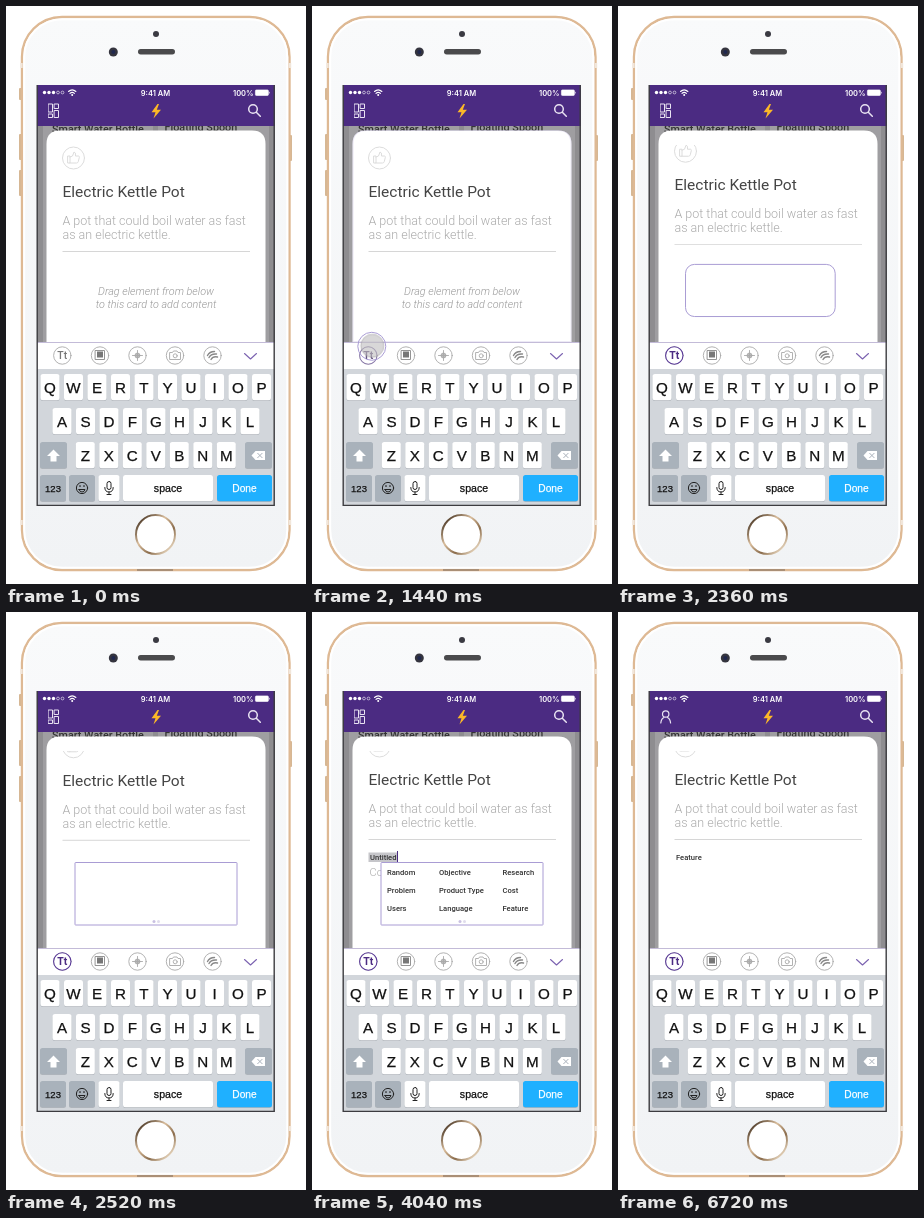
An HTML page for the animation above (7040 ms loop, 300x578 px).

```html
<!DOCTYPE html>
<html lang="en">
<head>
<meta charset="utf-8">
<title>Add a text element</title>
<style>
  html, body { margin: 0; width: 100%; height: 100%; overflow: hidden; background: #fff; }
  svg { display: block; width: 300px; height: 578px; }
  text { font-family: Roboto, sans-serif; }
  .status { font-family: Inter, sans-serif; }
  .keys text { font-family: "Liberation Sans", sans-serif; }
  .mid { text-anchor: middle; }
  .line { fill: none; stroke-linecap: round; stroke-linejoin: round; }
  .bold { font-size: 7.6px; font-weight: 500; fill: #333; }
  .touch { fill: rgba(190, 188, 190, .6); stroke: rgba(150, 147, 150, .45); }

  .a { animation: 7.04s linear infinite; }
  .cut { animation-timing-function: step-end; }

  #press { animation-name: press; }
  #drag { animation-name: drag; }
  #active { animation-name: active; }
  #glow { animation-name: glow; }
  #hint { animation-name: hint; }
  #scroll { animation-name: scroll; }
  #box { animation-name: morph; }
  #popup { animation-name: popup; }
  #dots { animation-name: dots; }
  #words, #draft { animation-name: words; }
  #untitled { animation-name: untitled; }
  #feature { animation-name: feature; }
  #pick { animation-name: pick; }
  #caret1 { animation-name: caret1; }
  #caret2 { animation-name: caret2; }
  #tiles { animation-name: tiles; }
  #person { animation-name: person; }

  @keyframes press { 0%, 15.3% { opacity: 0 } 17.6%, 26.14% { opacity: 1 } 28.4%, 100% { opacity: 0 } }
  @keyframes drag {
    0%, 19.03% { transform: none; animation-timing-function: ease-in-out }
    23.3%, 100% { transform: translate(16px, -41px) }
  }
  @keyframes active { 0%, 19% { opacity: 0 } 22%, 100% { opacity: 1 } }
  @keyframes glow { 0%, 19.6% { opacity: 0 } 23.3%, 27% { opacity: 1 } 28.98% { opacity: .6 } 32%, 100% { opacity: 0 } }
  @keyframes hint { 0%, 26.14% { opacity: 1 } 28.4%, 100% { opacity: 0 } }
  @keyframes scroll {
    0%, 31.25% { transform: none; animation-timing-function: ease-in-out }
    36.6%, 100% { transform: translateY(-18px) }
  }
  @keyframes morph {
    0%, 17.6% { x: 42px; y: 336px; width: 28px; height: 28px; rx: 14px; opacity: 0; fill-opacity: 0 }
    19.03% { x: 42px; y: 336px; width: 28px; height: 28px; rx: 14px; opacity: 1; fill-opacity: 0; animation-timing-function: ease-in-out }
    23.3%, 28.98% { x: 58px; y: 295px; width: 28px; height: 28px; rx: 14px; opacity: 1; fill-opacity: 0; animation-timing-function: cubic-bezier(.5, 0, .55, .9) }
    33.52% { x: 67.5px; y: 258.5px; width: 149.5px; height: 52px; rx: 9px; opacity: 1; fill-opacity: 1; animation-timing-function: ease-out }
    35.8%, 100% { x: 69px; y: 250.5px; width: 162px; height: 62.5px; rx: .5px; opacity: 1; fill-opacity: 1 }
  }
  @keyframes popup { 0% { opacity: 1 } 73.29%, 100% { opacity: 0 } }
  @keyframes dots { 0%, 34.6% { opacity: 0 } 35.8%, 100% { opacity: 1 } }
  @keyframes words { 0%, 36.3% { opacity: 0 } 40.6%, 100% { opacity: 1 } }
  @keyframes untitled { 0% { opacity: 1 } 71.01%, 100% { opacity: 0 } }
  @keyframes feature { 0% { opacity: 0 } 71.01%, 100% { opacity: 1 } }
  @keyframes pick { 0%, 68.6% { opacity: 0 } 70.4%, 71% { opacity: 1 } 72.7%, 100% { opacity: 0 } }
  @keyframes caret1 { 0% { opacity: 0 } 46.01% { opacity: 1 } 51.69% { opacity: 0 } 57.38% { opacity: 1 } 62.49%, 100% { opacity: 0 } }
  @keyframes caret2 { 0% { opacity: 0 } 78.97% { opacity: 1 } 84.65% { opacity: 0 } 90.33% { opacity: 1 } 95.44%, 100% { opacity: 0 } }
  @keyframes tiles { 0%, 78.8% { opacity: 1 } 83.2%, 100% { opacity: 0 } }
  @keyframes person { 0%, 78.8% { opacity: 0 } 83.2%, 100% { opacity: 1 } }
</style>
</head>
<body>
<svg viewBox="0 0 300 578">
  <defs>
    <clipPath id="screen"><rect x="31" y="79" width="238" height="421"/></clipPath>
    <clipPath id="page"><rect x="40" y="139.5" width="220" height="196.5"/></clipPath>
    <clipPath id="below"><rect x="31" y="120" width="238" height="216"/></clipPath>
    <linearGradient id="shell" x2="0" y2="1">
      <stop stop-color="#f9fafb"/><stop offset="1" stop-color="#f1f3f5"/>
    </linearGradient>
    <linearGradient id="metal" x2="1" y2="1">
      <stop offset=".1" stop-color="#4d3a28"/><stop offset=".4" stop-color="#d9bd9c"/>
      <stop offset=".65" stop-color="#8a6c4c"/><stop offset=".9" stop-color="#eddcc4"/>
    </linearGradient>
  </defs>

  <!-- phone body -->
  <g fill="#d6b794">
    <rect x="13" y="82" width="3" height="12" rx="1"/>
    <rect x="13" y="128" width="3" height="26" rx="1"/>
    <rect x="13" y="164" width="3" height="26" rx="1"/>
    <rect x="283" y="129" width="3" height="26" rx="1"/>
  </g>
  <rect x="16" y="11" width="267.5" height="553" rx="40" fill="url(#shell)" stroke="#deb994" stroke-width="2.4"/>
  <rect x="18.2" y="13.2" width="263.1" height="548.6" rx="38" fill="none" stroke="#fff" stroke-width="2"/>
  <path d="M15.5 57v5M284 57v5M15.5 514v5M284 514v5" stroke="#f1e6da" stroke-width="2.4"/>
  <path d="M131 564h36" stroke="#99826c" stroke-width="1.5"/>
  <circle cx="150" cy="28" r="3" fill="#3a3a42"/>
  <circle cx="107.3" cy="46" r="4.5" fill="#34343e"/>
  <circle cx="107.3" cy="46" r="2" fill="#20284e"/>
  <rect x="132" y="43" width="37" height="5.4" rx="2.7" fill="#4a4a4c"/>
  <circle cx="149.5" cy="528.5" r="19.5" fill="#fff" stroke="url(#metal)" stroke-width="2"/>

  <g clip-path="url(#screen)">
    <!-- dimmed list behind the card -->
    <rect x="31" y="120" width="238" height="216" fill="#8e8d90"/>
    <g clip-path="url(#below)">
      <path d="M37 120h110v216h-110zM152 120h111v216h-111z" fill="#9f9ea1"/>
      <g font-size="10.8" font-weight="500" fill="#333">
        <text x="46" y="126.8">Smart Water Bottle</text>
        <text x="158.5" y="125">Floating Spoon</text>
      </g>
    </g>

    <!-- header -->
    <rect x="31" y="79" width="238" height="41" fill="#4b2b82"/>
    <g fill="#fff" font-size="7.5" font-weight="600">
      <circle cx="38.5" cy="86.5" r="1.7"/><circle cx="43" cy="86.5" r="1.7"/><circle cx="47.5" cy="86.5" r="1.7"/>
      <g fill="none" stroke="#fff" stroke-width=".6"><circle cx="52" cy="86.5" r="1.4"/><circle cx="56.5" cy="86.5" r="1.4"/></g>
      <path class="line" d="M62.5 85.5q3.7-3.4 7.4 0M64 87.4q2.2-2 4.4 0" stroke="#fff" stroke-width="1.1"/>
      <circle cx="66.2" cy="89" r="1"/>
      <text class="status mid" x="149.5" y="89.5">9:41 AM</text>
      <text class="status" x="227" y="89.5">100%</text>
      <rect x="249.4" y="83.9" width="13" height="5.6" rx="1" stroke="#fff" stroke-width=".6"/>
      <path d="M263.3 85.5q1.5 1.2 0 2.4z"/>
    </g>
    <g class="line" stroke="#e9e3f2">
      <path id="tiles" class="a" d="M42.5 98h4v8h-4zM48.5 98h4v4.5h-4zM42.5 108h4v3.5h-4zM48.5 104.5h4v7h-4z"/>
      <g id="person" class="a" stroke-width="1.2">
        <circle cx="47.7" cy="102" r="3.2"/>
        <path d="M42.8 111q.5-4.5 3.2-5.5M52.6 111q-.5-4.5-3.2-5.5"/>
      </g>
      <g stroke-width="1.5"><circle cx="247" cy="103" r="4.3"/><path d="M250.3 106.3l4 4"/></g>
    </g>
    <path d="M151.5 98l-6 8.3h4l-2 6.2 7.5-8.7h-4.2l2.2-5.8z" fill="#fcb827"/>

    <!-- card -->
    <path d="M40.5 336V138q0-13.5 13.5-13.5h192q13.5 0 13.5 13.5v198z" fill="#fff"/>
    <g clip-path="url(#page)">
      <g id="scroll" class="a">
        <g class="line" stroke="#dcdcdc">
          <circle cx="67.5" cy="152" r="11"/>
          <path d="M62 150h2v7h-2zM64 151l2.5-1 1.5-4q2 0 1.5 4h3q1 0 .8 1.5l-1 4q-.3 1.5-1.8 1.5h-6.5"/>
        </g>
        <text x="56.5" y="191" font-size="15.5" fill="#444">Electric Kettle Pot</text>
        <g font-size="12.5" font-weight="300" fill="#aaa">
          <text x="56.5" y="219">A pot that could boil water as fast</text>
          <text x="56.5" y="233">as an electric kettle.</text>
        </g>
        <path d="M56.5 245.500H244" stroke="#d6d6d6"/>
      </g>
    </g>
    <g id="hint" class="a mid" font-size="10.8" font-weight="300" font-style="italic" fill="#999">
      <text x="150" y="289">Drag element from below</text>
      <text x="150" y="302">to this card to add content</text>
    </g>
    <path id="glow" class="a line" d="M41 335.5V138q0-13.5 13.5-13.5h191q13.5 0 13.5 13.5v197.5z" stroke="#b5a9dc" stroke-width="1.2"/>

    <!-- field being named -->
    <g id="draft" class="a">
      <g id="untitled" class="a cut">
        <rect x="56.5" y="240.5" width="29" height="9.5" fill="#c6c6ca"/>
        <text class="bold" x="58" y="248">Untitled</text>
        <text x="57.5" y="263.5" font-size="11" font-weight="300" fill="#aaa">Content</text>
      </g>
    </g>
    <text id="feature" class="a cut bold" x="58" y="248">Feature</text>
    <rect id="caret1" class="a cut" x="85" y="239" width="1" height="12" fill="#4b2b82"/>
    <rect id="caret2" class="a cut" x="58.5" y="252" width="1" height="13" fill="#4b2b82"/>

    <!-- toolbar -->
    <rect x="31" y="336" width="238" height="27" fill="#fff"/>
    <path d="M31 336.5h238" stroke="#c3bbd8"/>
    <g class="line" stroke="#aaa" stroke-width=".9">
      <g id="rings"></g>
      <rect x="89.5" y="344.5" width="9" height="9" stroke="#888"/>
      <rect x="91" y="345.5" width="6" height="6" fill="#777" stroke="none"/>
      <circle cx="131.5" cy="349.5" r="2.5" fill="#bbb"/>
      <path d="M126.5 349.5h10M131.5 344.5v10"/>
      <path d="M164 346.5h2.500l1-1.500h3.500l1 1.500h2.500v7h-10.500z"/><circle cx="169.2" cy="349.8" r="2"/>
      <path d="M201.500 349.500q2-4 7-4M203 351.500q2-4 7.500-3.500M205 353.500q2-3.500 6.500-2.500" stroke="#888" stroke-width="1.4"/>
    </g>
    <text class="mid" x="56.3" y="353.3" font-size="10.5" font-weight="500" fill="#777">Tt</text>
    <g id="active" class="a">
      <circle cx="56.3" cy="349.5" r="8.7" fill="#fff" stroke="#5a3a98" stroke-width="1.1"/>
      <text class="mid" x="56.3" y="353.3" font-size="10.5" font-weight="700" fill="#4b2b82">Tt</text>
    </g>
    <path class="line" d="M238.5 347.500l6 5.500 6-5.500" stroke="#7b62b0" stroke-width="1.1"/>

    <!-- keyboard -->
    <rect x="31" y="363" width="238" height="137" fill="#d2d6db"/>
    <g id="keys" class="keys mid"></g>
    <path d="M47.5 443.500l6.500 6.500h-3.500v5.500h-6v-5.500h-3.500z" fill="#fff"/>
    <path d="M245.500 449.500l4-4.500h9.500v9h-9.500z" fill="#fff"/>
    <path class="line" d="M251.7 447.3l4.4 4.4M256.1 447.3l-4.4 4.4" stroke="#a9b1bb"/>
    <g class="line" stroke="#222">
      <circle cx="76" cy="482" r="5.6"/>
      <path d="M73 483.500h6q-.7 2.500-3 2.500t-3-2.500z"/>
      <path d="M74 479.500v1M78 479.500v1" stroke-width="1.2"/>
      <rect x="101" y="475.5" width="4" height="8" rx="2"/>
      <path d="M98.800 481.500q0 4.500 4.200 4.500t4.200-4.500M103 486v2.500M101 488.500h4"/>
    </g>
  </g>
  <path d="M31.200 79v420.400h237V79" fill="none" stroke="#3c3c40" stroke-width="1.4"/>

  <!-- dragged element, growing into the list of titles -->
  <g id="popup" class="a cut">
    <rect id="box" class="a" fill="#fff" stroke="#a99cd4"/>
    <g id="dots" class="a"><circle cx="148" cy="309.5" r="1.5" fill="#c9c0e2"/><circle cx="152.5" cy="309.5" r="1.5" fill="#e0dcec"/></g>
    <g id="words" class="a bold"></g>
  </g>
  <circle id="pick" class="a touch" cx="203" cy="296" r="11.5"/>
  <g id="drag" class="a"><circle id="press" class="a touch" cx="56.5" cy="349.5" r="11.5"/></g>
</svg>
<script>
  const add = (parent, tag, attrs, text = "") => {
    const el = document.createElementNS("http://www.w3.org/2000/svg", tag);
    for (const name in attrs) el.setAttribute(name, attrs[name]);
    el.textContent = text;
    document.getElementById(parent).append(el);
  };

  function key(x, y, w, fill, label = "", size = 15.2, color = "#111") {
    const shape = { x, width: w, height: 26.3, rx: 2.5 };
    add("keys", "rect", { ...shape, y: y + .7, fill: "#b0b5bb" });
    add("keys", "rect", { ...shape, y, fill });
    add("keys", "text", {
      x: x + w / 2, y: y + 13.2 + size * .36, "font-size": size,
      fill: color, stroke: color, "stroke-width": .25
    }, label);
  }

  const white = "#fff", grey = "#a9b2bb";
  [["QWERTYUIOP", 44, 368], ["ASDFGHJKL", 56, 402], ["ZXCVBNM", 79.3, 436]].forEach(([row, x, y]) =>
    [...row].forEach((letter, i) => key(x + i * 23.5 - 9.5, y, 19, white, letter)));
  key(34, 436, 27, grey);
  key(239, 436, 27, grey);
  key(34, 469, 26, grey, "123", 9.5);
  key(63, 469, 26, grey);
  key(92.5, 469, 21, white);
  key(117, 469, 90, white, "space", 10.6);
  key(211, 469, 55, "#1fb0ff", "Done", 10.2, white);

  for (const cx of [56.3, 94, 131.5, 169, 206.5]) add("rings", "circle", { cx, cy: 349.5, r: 8.7 });

  const titles = ["Random", "Objective", "Research", "Problem", "Product Type", "Cost", "Users", "Language", "Feature"];
  titles.forEach((title, i) =>
    add("words", "text", { x: [75, 127, 190.5][i % 3], y: 263 + 18 * Math.floor(i / 3) }, title));
</script>
</body>
</html>
```
